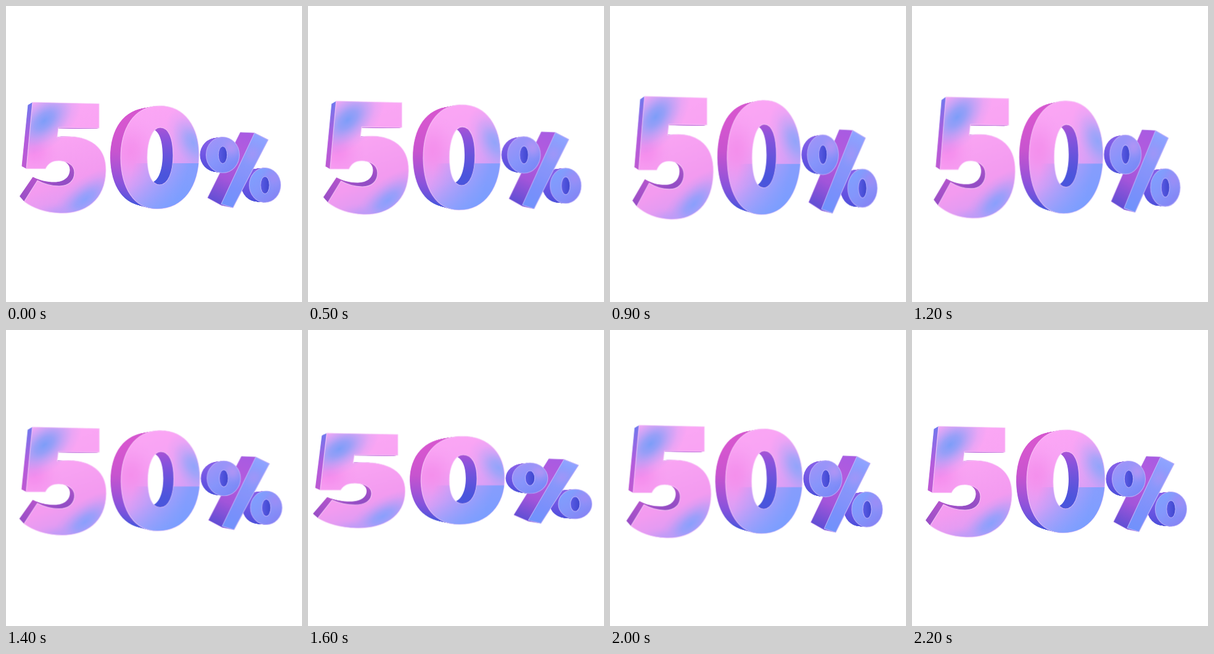
Recreate the animation shown at these times as an HTML page. Size 480 px wide and 480 px high, loop 2.3 s.

```html
<!DOCTYPE html>
<html lang="en">
<head>
<meta charset="utf-8">
<title>50%</title>
<style>
  html, body { margin: 0; width: 100%; height: 100%; overflow: hidden; background: #fff; }
  svg { display: block; width: 100vw; height: 100vh; }
  #art { animation: bounce 2300ms -2ms infinite; }
  /* stretch, squash, overshoot, settle; each drawn on tenths of a second */
  @keyframes bounce {
    0% { transform: translate(0px, 0px) scale(1, 1); animation-timing-function: step-end; }
    17.3913% { transform: translate(0px, 0px) scale(1, 1); animation-timing-function: steps(7); }
    47.82609% { transform: translate(21.9px, -37.5px) scale(.9127, 1.153); animation-timing-function: steps(5); }
    69.56522% { transform: translate(-15.5px, 33.7px) scale(1.0684, .8556); animation-timing-function: steps(2); }
    78.26087% { transform: translate(9.8px, -8.7px) scale(.9623, 1.033); animation-timing-function: steps(4); }
    95.65217%, 100% { transform: translate(0px, 0px) scale(1, 1); animation-timing-function: step-end; }
  }
</style>
</head>
<body>
<svg viewBox="0 0 480 480" role="img" aria-label="50%">
  <defs id="defs"></defs>
  <g id="art"></g>
</svg>
<script>
const NS = 'http://www.w3.org/2000/svg';
const defs = document.getElementById('defs');
const art = document.getElementById('art');
let count = 0;

function add(parent, tag, attrs) {
  const el = document.createElementNS(NS, tag);
  for (const k in attrs) el.setAttribute(k, attrs[k]);
  parent.append(el);
  return el;
}

function linear([x1, y1, x2, y2], colors) {
  const id = 'g' + count++;
  const g = add(defs, 'linearGradient', { id, x1, y1, x2, y2, gradientUnits: 'userSpaceOnUse' });
  colors.forEach((c, i) => add(g, 'stop', { offset: i / (colors.length - 1), 'stop-color': c }));
  return `url(#${id})`;
}

// Soft patch of light, squeezed by `ratio` and turned by `turn` degrees
function spot([x, y, r, color, ratio = 1, turn = 0]) {
  const id = 'g' + count++;
  const g = add(defs, 'radialGradient', {
    id, cx: 0, cy: 0, r, gradientUnits: 'userSpaceOnUse',
    gradientTransform: `translate(${x} ${y}) rotate(${turn}) scale(1 ${ratio})`
  });
  [.95, .75, .4, .12, 0].forEach((o, i) => add(g, 'stop', { offset: i / 4, 'stop-color': color, 'stop-opacity': o }));
  return `url(#${id})`;
}

const oval = (x, y, rx, ry) =>
  `M${x - rx},${y}a${rx},${ry} 0 1 1 ${2 * rx},0a${rx},${ry} 0 1 1 ${-2 * rx},0Z`;

function face(d, fills, rim) {
  for (const fill of fills) add(art, 'path', { d, fill, 'fill-rule': 'evenodd' });
  add(art, 'path', { d, fill: 'none', stroke: rim, 'stroke-width': 1.1, 'stroke-linejoin': 'round', 'stroke-opacity': .8 });
}

// Stacked copies, sliding left and shrinking toward height cy, make the thickness
function extrude(d, fill, depth, shrink, cy) {
  const n = Math.ceil(depth * 1.8);
  for (let i = n; i > 0; i--) {
    const k = i / n, s = 1 - shrink * k;
    add(art, 'path', {
      d, fill, 'fill-rule': 'evenodd',
      transform: `translate(${-depth * k} ${cy * (1 - s)}) scale(1 ${s})`
    });
  }
}

function ring(x, y, rx, ry, depth, colors, glow) {
  const d = oval(x, y, rx, ry);
  extrude(d, linear([x - 28, y - 24, x - 8, y + 28], ['#8a62e8', '#6954e2', '#4a4fda']), depth, .05, y);
  face(d, [linear([x - 18, y - 24, x + 18, y + 24], colors), spot([x + 14, y - 12, 24, glow])], '#c3b4fc');
  add(art, 'path', {
    d: oval(x, y, 7.2, 14), fill: linear([x - 7, y, x + 7, y], ['#5a5be4', '#3f47cf']),
    stroke: '#b9b0fc', 'stroke-width': 1
  });
}

const five = 'M43,156L151,158.5V198L85,197L83,213C126,207 163,222 162,267C161,316 128,337 88,336' +
  'C63,335 44,328 29.5,317L51,283C62,289 73,292 86,292C102,292 111,283 111,270' +
  'C111,257 98,251 85,251C76,251 69,254 64,264L33,264Z';
extrude(five, linear([30, 160, 100, 310], ['#6f78ee', '#b45cdc', '#c058cf', '#7d48c0']), 7.5, .08, 212);
face(five, [
  linear([60, 160, 130, 340], ['#fba8f5', '#f9a4f3', '#f39bf0', '#cf9cf6']),
  spot([46, 236, 44, '#f58ced']),
  spot([62, 186, 72, '#779df9', .58, -42]),
  spot([128, 314, 70, '#86a0fd', .45, -38]),
  spot([84, 338, 40, '#bd9bf8', .5])
], '#fbd3fa');

const zero = 'M246,162C291,160 313,198 313,241C313,292 288,329 245,329C207,329 187,295 186,247' +
  'C186,197 208,164 246,162Z' +
  'M250,197C238,197 229,218 229,246C229,272 236,290 249,290C263,290 271,270 271,242C271,215 264,197 250,197Z';
extrude(zero, linear([174, 190, 262, 280], ['#e058cf', '#c754cf', '#8a53dc', '#4a55dc']), 17, .05, 232);
face(zero, [
  linear([215, 170, 275, 325], ['#fba6f5', '#f7a3f4', '#d69ff7', '#8aa3fe']),
  spot([202, 236, 46, '#f48fec', 1.3]),
  spot([304, 222, 62, '#8ea5fb', .6, 58])
], '#f9cff9');

// The glossy lower half starts at a crisp horizon
const gloss = add(defs, 'clipPath', { id: 'gloss' });
add(gloss, 'path', { d: zero, 'clip-rule': 'evenodd' });
add(art, 'rect', {
  x: 183, y: 255, width: 131, height: 75, 'clip-path': 'url(#gloss)',
  fill: linear([205, 262, 290, 285], ['#769dff00', '#769dff66', '#769dffd0'])
});

ring(420, 290.5, 25.5, 28, 13, ['#80a0fe', '#8496fb', '#8583f4'], '#9c8df6');

add(art, 'path', {
  d: 'M380,205L403,206L425,217L368,327L349,323L327,311Z',
  fill: linear([388, 206, 338, 318], ['#a95be2', '#b45cdd', '#a255da', '#5f4fd4']),
  stroke: '#b07ae8', 'stroke-width': .8, 'stroke-linejoin': 'round'
});
face('M403,206L425,217L368,327L349,321Z', [
  linear([412, 210, 358, 325], ['#92a4ff', '#7d9cfe', '#8794fa', '#7a90fb', '#7092fb']),
  spot([400, 240, 28, '#a096f8'])
], '#c8bdfd');

ring(351.5, 241.5, 27, 29, 10, ['#9f94f8', '#8795fb', '#7a88f6'], '#b194f5');
</script>
</body>
</html>
```
